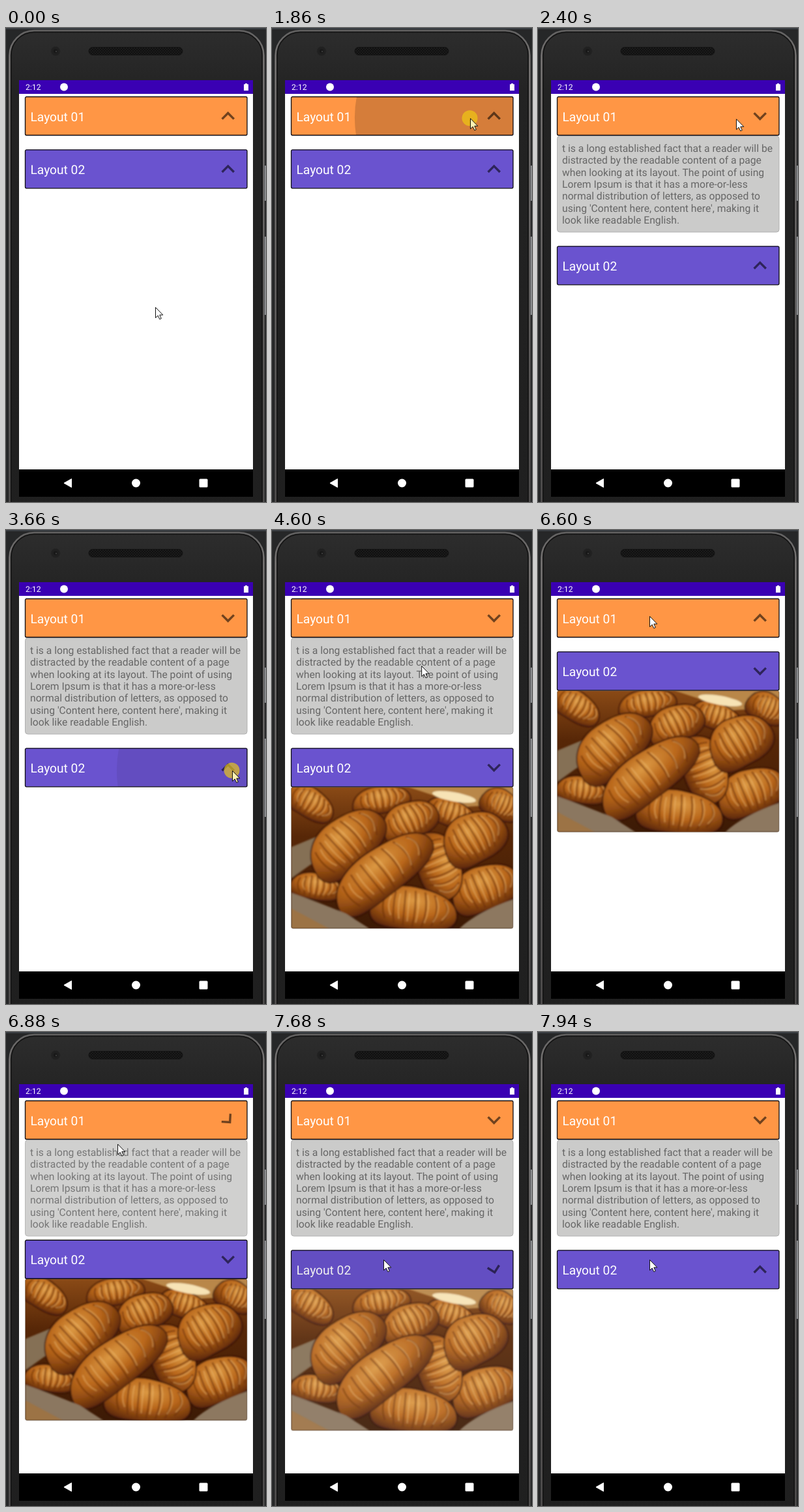
An HTML page that plays this animation: 399 px wide and 727 px high, repeating every 8 s.

```html
<!DOCTYPE html>
<html lang="en">
<head>
<meta charset="utf-8">
<title>Expandable layouts</title>
<style>
html, body { margin: 0; width: 100%; height: 100%; overflow: hidden; background: #262728; }
svg { display: block; position: absolute; left: 0; top: 0; }
text { font-family: Roboto, sans-serif; text-rendering: geometricPrecision; }
</style>
</head>
<body>
<svg width="399" height="727" viewBox="0 0 399 727">
  <defs>
    <linearGradient id="body" x1="0" y1="0" x2="0" y2="1">
      <stop offset="0" stop-color="#2d2d2d"/><stop offset=".12" stop-color="#232323"/><stop offset="1" stop-color="#1f1f1f"/>
    </linearGradient>
    <linearGradient id="rim" x1="0" y1="0" x2="0" y2="1">
      <stop offset="0" stop-color="#626161"/><stop offset=".06" stop-color="#7a7776"/><stop offset="1" stop-color="#4d4b4b"/>
    </linearGradient>
    <linearGradient id="key" x1="0" y1="0" x2="1" y2="0">
      <stop offset="0" stop-color="#55575a"/><stop offset="1" stop-color="#a2a3a5"/>
    </linearGradient>
    <radialGradient id="crust" cx=".5" cy=".32" r=".72">
      <stop offset="0" stop-color="#dd9a44"/><stop offset=".5" stop-color="#b9671b"/><stop offset="1" stop-color="#5f2907"/>
    </radialGradient>
    <linearGradient id="shade" x1="0" y1="0" x2="0" y2="1">
      <stop offset="0" stop-color="#8a4a16"/><stop offset=".35" stop-color="#572707"/><stop offset="1" stop-color="#3c1a05"/>
    </linearGradient>
    <pattern id="mesh" width="4" height="4" patternUnits="userSpaceOnUse">
      <rect width="4" height="4" fill="#1b1b1b"/><circle cx="1" cy="1" r=".9" fill="#0a0a0a"/><circle cx="3" cy="3" r=".9" fill="#0a0a0a"/>
    </pattern>
    <filter id="soft"><feGaussianBlur stdDeviation="1.1"/></filter>
    <clipPath id="cardClip"><rect x="29.5" y="0" width="340.5" height="59" rx="2"/></clipPath>
    <clipPath id="photoClip"><rect x="29.5" y="0" width="340.5" height="217" rx="3"/></clipPath>
  </defs>

  <rect width="399" height="727" fill="#262728"/>
  <rect width="399" height="2" fill="#393d42"/>
  <rect x="5.5" y="4" width="390" height="780" rx="38" fill="url(#body)" stroke="url(#rim)" stroke-width="2.5"/>
  <rect x="8" y="6.5" width="385" height="775" rx="35" fill="none" stroke="#141414" stroke-width="1.5"/>
  <rect x="396" y="211" width="3" height="54" fill="url(#key)"/>
  <rect x="396" y="320" width="3" height="120" fill="url(#key)"/>
  <circle cx="76" cy="35.5" r="7" fill="#202020" stroke="#262626"/>
  <circle cx="76" cy="35.5" r="3" fill="#181818"/>
  <circle cx="77" cy="36" r="1.2" fill="#3c3c3c"/>
  <rect x="127" y="29.5" width="144" height="12" rx="6" fill="url(#mesh)" stroke="#141414"/>

  <rect x="20" y="80" width="359" height="639" fill="#fff"/>
  <rect x="20" y="80" width="359" height="21" fill="#3a00b3"/>
  <text x="30" y="95" font-size="12.2" fill="#fff">2:12</text>
  <circle cx="89" cy="90.5" r="6" fill="#fff"/>
  <path d="M367 85h3v1.2h2V96h-7V86.2h2z" fill="#fff"/>
  <rect x="20" y="677" width="359" height="42" fill="#000"/>
  <path d="M89 698l11.5-6.5v13z" fill="#fff" stroke="#fff" stroke-linejoin="round"/>
  <circle cx="199.5" cy="698" r="6.5" fill="#fff"/>
  <rect x="296.5" y="691.5" width="13" height="13" rx="1.5" fill="#fff"/>

  <g id="stack"></g>

  <circle id="dot" r="12" fill="#f0cd10" fill-opacity=".66"/>
  <path id="cursor" d="M.5 .5V16.5L4.2 13.1 6.8 18.7 9.3 17.6 6.8 12.1H11.8Z" stroke="#111" stroke-linejoin="round"/>
</svg>
<script>
const LOOP = 8000, MOVE = 300, DROP = 148;
const OPEN_LAG = 33, CLOSE_LAG = 60; // fades and arrows trail the sliding cards
const $ = id => document.getElementById(id);
const clamp = v => Math.max(0, Math.min(1, v));
const ramp = (t, a, b) => clamp((t - a) / (b - a));
const ease = v => .5 - .5 * Math.cos(Math.PI * v);

const lines = [
  "t is a long established fact that a reader will be",
  "distracted by the readable content of a page",
  "when looking at its layout. The point of using",
  "Lorem Ipsum is that it has a more-or-less",
  "normal distribution of letters, as opposed to",
  "using 'Content here, content here', making it",
  "look like readable English."
];

// Each pastry: centre, radii, tilt
const pastries = [
  [28, 24, 40, 22, 30], [138, 20, 44, 20, -10], [322, 27, 32, 22, 25], [245, 40, 40, 20, 20],
  [182, 52, 44, 28, -25], [38, 153, 40, 20, 8], [298, 155, 54, 34, -22], [226, 120, 54, 34, 68],
  [188, 187, 66, 33, 6], [85, 86, 66, 39, -42], [281, 78, 50, 38, -30], [140, 130, 88, 36, -38]
];

function pastry([x, y, rx, ry, tilt]) {
  let ribs = "";
  for (let i = -3; i <= 3; i++) {
    const u = i / 4, h = ry * Math.sqrt(1 - u * u) * .85, c = u * rx;
    ribs += `M${c - 6 * u} ${-h}Q${c + 8 * u + 4} 0 ${c - 9 * u} ${h}`;
  }
  // Fuller back, flatter belly, blunt tips
  const hull = `M${-rx} ${ry * .3}C${-rx * .95} ${-ry * .8} ${-rx * .4} ${-ry * 1.1} 0 ${-ry}
    S${rx * .95} ${-ry * .7} ${rx} ${ry * .1}S${rx * .4} ${ry} 0 ${ry * .95}S${-rx * .95} ${ry * 1.1} ${-rx} ${ry * .3}Z`;
  return `<g transform="translate(${x} ${y}) rotate(${tilt})">
    <path d="${hull}" fill="url(#crust)" stroke="#36150a" stroke-opacity=".75" stroke-width="4" paint-order="stroke"/>
    <path d="${ribs}" fill="none" stroke="#6b3009" stroke-width="2.6" opacity=".6"/>
    <path d="${ribs}" transform="translate(5 -2) scale(.92 .8)" fill="none" stroke="#f2c47c" stroke-width="2.4" opacity=".42"/></g>`;
}

const photo = `<g id="photo"><g clip-path="url(#photoClip)">
  <rect x="29" width="342" height="217" fill="url(#shade)"/>
  <g transform="translate(29.5 0)" filter="url(#soft)">
    <path d="M180 0H341V26L270 30Z" fill="#b98749"/>
    <path d="M0 92L58 68 62 96 0 140Z" fill="#857055"/>
    ${pastries.map(pastry).join("")}
    <ellipse cx="250" cy="15" rx="34" ry="7" fill="#f7e3b5" transform="rotate(10 250 15)"/>
    <path d="M0 162Q40 176 84 194L120 217H0Z" fill="#8b7760"/>
    <path d="M0 186L58 217H0Z" fill="#9c7344"/>
    <path d="M258 217Q284 192 341 172V217Z" fill="#8d7861"/>
  </g></g>
  <rect x="29.5" y="0" width="340.5" height="217" rx="3" fill="none" stroke="#8a8175" stroke-opacity=".6"/></g>`;

const note = `<g id="note">
  <rect x="29.5" y="165.5" width="340.5" height="147.5" rx="4" fill="#cbcbca" stroke="#b0b0b0"/>
  <g font-size="15.68" fill="#666">${lines.map((s, i) =>
    `<text x="37" y="${190 + i * 18.3}">${s}</text>`).join("")}</g></g>`;

const card = (n, color) => `<g id="card${n}">
  <rect x="29.5" y="0" width="340.5" height="59" rx="2" fill="${color}"/>
  <text x="37.5" y="37" font-size="19.2" fill="#fff">Layout 0${n}</text>
  <path id="arrow${n}" d="M0 -4l-6 6 1.41 1.41L0 -1.17l4.59 4.58L6 2z" fill="#000" fill-opacity=".56"/>
  <g clip-path="url(#cardClip)"><circle id="ripple${n}" fill="#000"/></g>
  <rect x="29.5" y="0" width="340.5" height="59" rx="2" fill="none" stroke="#0c0a12" stroke-width="1.3"/></g>`;

$("stack").innerHTML = note + photo + card(1, "#ff9645") + card(2, "#6a53cf");

// Cursor path: time, x, y
const path = [
  [70, 229, 428], [260, 233, 405], [720, 233, 405], [1100, 262, 270], [1520, 296, 175],
  [1600, 299, 158], [1680, 304, 138], [2400, 304, 139], [2600, 297, 190], [2950, 328, 320],
  [3200, 346, 371], [3260, 347, 372], [3400, 347, 372], [3480, 347, 369], [4400, 347, 368],
  [4600, 229.5, 208.5], [4780, 165, 140], [4860, 166, 127], [4940, 171, 132], [6680, 171, 132],
  [6880, 171, 171], [7060, 172, 262], [7280, 171, 349]
];

function cursorAt(t) {
  const i = path.findIndex(p => p[0] > t);
  if (i < 0) return path[path.length - 1].slice(1);
  if (i === 0) return path[0].slice(1);
  const a = path[i - 1], b = path[i], k = ramp(t, a[0], b[0]);
  return [a[1] + (b[1] - a[1]) * k, a[2] + (b[2] - a[2]) * k];
}

// y is measured from the card's top edge
const presses = [
  { card: 1, x: 304, y: 32, down: 1670, up: 1950, grow: 1700, fade: [1960, 2250], dark: .165 },
  { card: 2, x: 347, y: 34, down: 3460, up: 3760, grow: 3500, fade: [3800, 4130], dark: .07 },
  { card: 1, x: 171, y: 27, down: 5800, up: 5990, grow: 5830, fade: [6130, 6320], dark: .17 },
  { card: 1, x: 171, y: 27, down: 6360, up: 6520, grow: 6370, fade: [6500, 6600], dark: .165 },
  { card: 2, x: 171, y: 14, down: 7300, up: 7470, grow: 7320, fade: [7560, 7880], dark: .1 }
];

// Alternating open and close times of each card
const toggles = { 1: [1900, 5905, 6644], 2: [3740, 7570] };

function openness(n, t, openLag = 0, closeLag = 0) {
  let v = 0;
  toggles[n].forEach((at, i) => {
    const closing = i % 2, from = at + (closing ? closeLag : openLag);
    const k = ease(ramp(t, from, from + MOVE));
    if (t >= from) v = closing ? 1 - k : k;
  });
  return v;
}

const place = (id, y) => $(id).setAttribute("transform", `translate(0 ${y})`);
let raised = null;

function draw(t) {
  const open1 = openness(1, t);
  const late = [1, 2].map(n => openness(n, t, OPEN_LAG, CLOSE_LAG));
  const top2 = 186.8 + DROP * open1;
  place("card1", 105.5);
  place("card2", top2);
  place("photo", top2 + 59.5);

  // A closing panel fades out above the moving card
  const closing = t >= toggles[1][1] && t < toggles[1][2];
  if (closing !== raised) {
    raised = closing;
    closing ? $("stack").append($("note")) : $("stack").prepend($("note"));
  }
  $("note").setAttribute("opacity", closing ? late[0] : open1);
  $("photo").setAttribute("opacity", late[1]);

  late.forEach((v, i) => $("arrow" + (i + 1)).setAttribute(
    "transform", `translate(340.7 29.5) rotate(${180 * v}) scale(1.72)`));

  for (const n of [1, 2]) {
    const p = presses.find(q => q.card === n && t >= q.grow && t < q.fade[1]);
    const r = $("ripple" + n);
    r.setAttribute("r", p ? Math.min(350, (t - p.grow) * 1.1) : 0);
    if (!p) continue;
    r.setAttribute("cx", p.x);
    r.setAttribute("cy", p.y);
    r.setAttribute("opacity", p.dark * (1 - ramp(t, ...p.fade)));
  }

  const [x, y] = cursorAt(t);
  const held = presses.some(p => t >= p.down && t < p.up);
  $("cursor").setAttribute("transform", `translate(${x} ${y})`);
  $("cursor").setAttribute("fill", held ? "#fff3b4" : "#fff");
  $("dot").setAttribute("transform", `translate(${x - .5} ${y})`);
  $("dot").setAttribute("opacity", held ? 1 : 0);
}

const start = performance.now();
function tick() {
  draw((performance.now() - start) % LOOP);
  requestAnimationFrame(tick);
}
tick();
</script>
</body>
</html>
```
